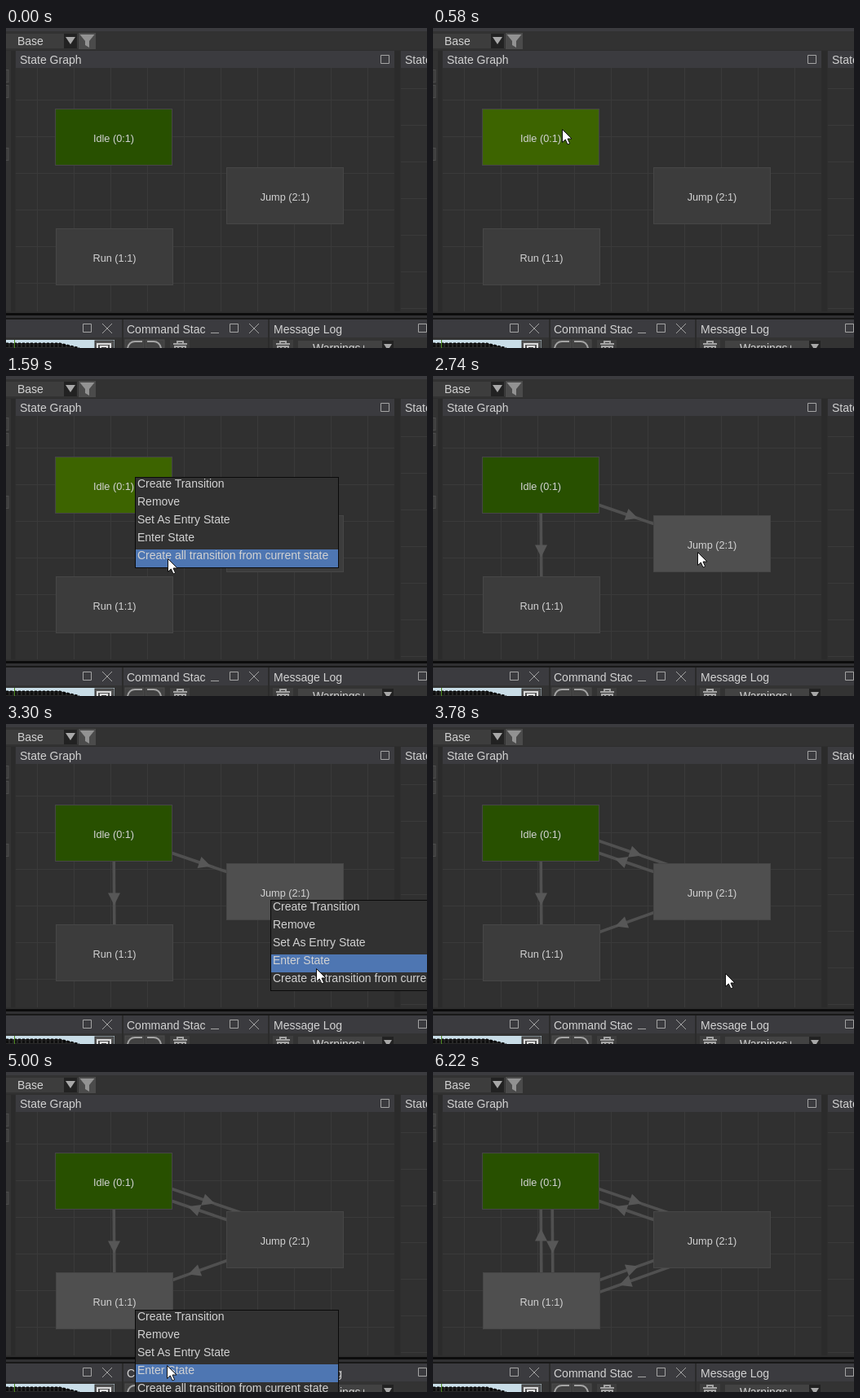
These frames come from a looping animation (516 by 393 pixels, 6.85 s). An HTML page:

```html
<!DOCTYPE html>
<html lang="en">
<head>
<meta charset="utf-8">
<title>State graph editor</title>
<style>
  html, body { margin: 0; width: 100%; height: 100%; overflow: hidden; background: #2e2e2e; }
  svg { display: block; width: 516px; height: 393px; }
  text { font: 14px "Liberation Sans", Arial, sans-serif; fill: #d2d2d2; white-space: pre; }
  .node { font-size: 12.7px; text-anchor: middle; }
</style>
</head>
<body>
<svg id="stage" viewBox="0 0 516 393"></svg>
<script>
const LOOP = 6850;
const stage = document.getElementById('stage');

function add(tag, attrs, parent = stage) {
  const el = document.createElementNS('http://www.w3.org/2000/svg', tag);
  for (const key in attrs) el.setAttribute(key, attrs[key]);
  parent.appendChild(el);
  return el;
}
const rect = (x, y, width, height, fill, parent, extra) =>
  add('rect', { x, y, width, height, fill, ...extra }, parent);
const path = (d, fill, stroke, parent, width = 1) =>
  add('path', { d, fill: fill || 'none', stroke: stroke || 'none', 'stroke-width': width }, parent);
function label(x, y, content, parent, cls = '') {
  const el = add('text', { x, y, class: cls }, parent);
  el.textContent = content;
  return el;
}
const show = (el, on) => el.setAttribute('visibility', on ? 'visible' : 'hidden');

const HEADER = '#3b3b3f', BODY = '#303030', GRID = '#3a3a3a', ICON = '#a4a4a4';

function square(x, y) { path(`M${x}.5 ${y}.5h10v10h-10z`, null, ICON); }
function cross(x, y) { path(`M${x} ${y}l12 12m0-12l-12 12`, null, ICON); }
function trash(x, y) {
  path(`M${x} ${y + 3}h17M${x + 5} ${y + 2}v-2h7v2M${x + 2} ${y + 6}h13v14h-13zM${x + 6} ${y + 7}v9m5-9v9`, null, ICON, stage, 2);
}
function gridPanel(x, width, title, gridX, gridY) {
  rect(x, 28, width, 21, HEADER);
  rect(x, 49, width, 299, BODY);
  let d = '';
  for (let y = gridY; y < 348; y += 45) d += `M${x} ${y}h${width}`;
  for (let gx = gridX; gx < x + width; gx += 45) d += `M${gx} 49v299`;
  path(d, null, GRID);
  label(x + 5, 44, title);
}

function drawWindow() {
  rect(0, 0, 516, 393, '#2e2e2e');
  rect(0, 0, 516, 4, '#3b3b3f');
  rect(0, 4, 516, 23, '#323232');
  rect(0, 7, 88, 18, '#3d3d3d');
  rect(71, 7, 16, 18, '#222');
  path('M73 11h12l-6 9z', '#a8a8a8');
  label(14, 21, 'Base');
  rect(89, 6, 21, 20, '#4b4b4b');
  path('M90.5 8h18l-6.5 8v8l-5-3v-5z', '#929292');

  rect(0, 28, 6, 320, '#333');
  for (const y of [51, 70, 147]) rect(-2, y + .5, 5, 15, '#3d3d3d', stage, { stroke: '#4d4d4d' });
  rect(6, 28, 5, 320, '#2b2b2b');
  gridPanel(12, 464, 'State Graph', 38.5, 88.5);
  square(459, 33);
  gridPanel(484, 32, 'State', 516, 74.5);
  rect(476, 28, 7, 320, '#2b2b2b');

  rect(0, 350, 516, 3, '#0c0c0c');
  rect(0, 353, 516, 4, '#303032');
  rect(0, 356, 516, 2, '#181818');
  rect(0, 358, 516, 35, '#2b2b2b');
  for (const [x, w] of [[0, 142], [144, 177], [323, 193]]) {
    rect(x, 358, w, 22, HEADER);
    rect(x, 380, w, 13, '#333');
  }
  label(148, 375, 'Command Stac');
  label(328, 375, 'Message Log');
  square(94, 363); cross(118, 363);
  path('M251 374.5h10', null, ICON);
  square(274, 363); cross(298, 363);
  square(505, 363);

  // Viewport sliver
  rect(0, 383, 133, 10, '#c9dde7');
  path('M0 387H66L90 393H0z', '#272727');
  path('M0 387.5H66L90 393M0 390.5H78', null, '#050505', stage, 2).setAttribute('stroke-dasharray', '3 2');
  rect(10, 383, 1, 10, '#4c8a20');
  rect(109, 384, 23, 9, '#555', stage, { stroke: '#333' });
  path('M112 393v-5h16v5M116 393v-2h8v2', null, '#ddd', stage, 2);

  for (const x of [146, 171]) rect(x, 383, 23, 10, '#424242', stage, { stroke: '#4d4d4d' });
  path('M149 393q2-8 9-8h9M190 393q-2-8-9-8h-8', null, ICON, stage, 2);
  rect(201, 383, 24, 10, '#3d3d3d'); trash(205, 385);
  rect(327, 383, 25, 10, '#3d3d3d'); trash(331, 385);
  rect(358, 384, 117, 9, '#424242');
  rect(461, 384, 14, 9, '#222');
  path('M463 388h10l-5 8z', '#a8a8a8');
  label(376, 398, 'Warnings+');
}

function node(x, y, name, fill, hover, from, until) {
  const box = rect(x + .5, y + .5, 143, 69, fill, stage, { stroke: '#464646' });
  label(x + 72, y + 40.5, name, stage, 'node');
  return { box, fill, hover, from, until, cx: x + 72, cy: y + 35 };
}

// Transition arrow between node centres, moved sideways by offset; its head starts halfway
function edge(a, b, offset, from, until) {
  const dx = b.cx - a.cx, dy = b.cy - a.cy, length = Math.hypot(dx, dy);
  const x = (a.cx + b.cx) / 2 + offset * dy / length;
  const y = (a.cy + b.cy) / 2 - offset * dx / length;
  const angle = Math.atan2(dy, dx) * 180 / Math.PI;
  const el = add('g', { transform: `translate(${x} ${y}) rotate(${angle})` }, edgeLayer);
  path(`M${-length / 2} 0H${length / 2}`, null, '#505050', el, 3.6);
  path('M0-7.5L15 0L0 7.5z', '#575757', null, el);
  return { el, from, until };
}

const ITEMS = ['Create Transition', 'Remove', 'Set As Entry State', 'Enter State',
  'Create all transition from current state'];
function menu(x, y, from, until) {
  const el = add('g', {});
  rect(x + .5, y + .5, 249, 111, '#313131', el, { stroke: '#0a0a0a' });
  const bar = rect(x + 1, y + 1, 248, 22, '#4e76b2', el);
  ITEMS.forEach((item, i) => label(x + 3, y + 13 + 22 * i, item, el));
  return { el, bar, y, from, until };
}

drawWindow();
const edgeLayer = add('g', {});
const idle = node(60, 99, 'Idle (0:1)', '#285000', '#3d6400', 580, 2740);
const jump = node(270, 171, 'Jump (2:1)', '#3c3c3c', '#4f4f4f', 2740, 4310);
const run = node(61, 246, 'Run (1:1)', '#3c3c3c', '#4f4f4f', 4310, LOOP);
const nodes = [idle, jump, run];

// A transition moves aside once its opposite exists
const ASIDE = 14;
const edges = [
  edge(idle, run, 0, 2050, 5850),
  edge(idle, jump, 0, 2050, 3780),
  edge(idle, jump, ASIDE, 3780, LOOP),
  edge(jump, idle, 0, 3780, LOOP),
  edge(jump, run, 0, 3780, 5850),
  edge(jump, run, ASIDE, 5850, LOOP),
  edge(run, jump, 0, 5850, LOOP),
  edge(idle, run, ASIDE, 5850, LOOP),
  edge(run, idle, 0, 5850, LOOP)
];
const menus = [menu(158, 124, 830, 2050), menu(324, 216, 2910, 3780), menu(158, 292, 4690, 5850)];
const cursor = path('M.5.5V16.5L4.3 13L7 19L9.6 17.8L7 12H12z', '#fff', '#111');

// Pointer legs: first step, last step, number of steps, end point
const START = [340, 337];
const LEGS = [
  [70, 430, 6, 158, 124],
  [1060, 1210, 3, 184, 147],
  [1290, 1590, 5, 198, 224],
  [2430, 2590, 3, 324, 216],
  [3140, 3300, 3, 380, 300],
  [3380, 3450, 2, 384, 308],
  [3780, 4160, 6, 158, 292],
  [4770, 5000, 4, 197, 360],
  [5080, 5240, 3, 203, 374],
  [5390, 5540, 3, 206, 385],
  [5850, 6150, 5, 428, 388]
];
const ease = p => (p + (1 - Math.cos(Math.PI * p)) / 2) / 2;

function pointer(t) {
  let [x, y] = START;
  for (const [first, last, steps, toX, toY] of LEGS) {
    if (t < first) break;
    const gap = (last - first) / (steps - 1);
    const p = ease(Math.min(1, (Math.floor((t - first + 5) / gap) + 1) / steps));
    x += (toX - x) * p;
    y += (toY - y) * p;
  }
  return [Math.round(x), Math.round(y)];
}

function render(t) {
  const active = part => t >= part.from && t < part.until;
  const [x, y] = pointer(t);
  edges.forEach(e => show(e.el, active(e)));
  nodes.forEach(n => n.box.setAttribute('fill', active(n) ? n.hover : n.fill));
  menus.forEach(m => {
    show(m.el, active(m));
    const row = Math.max(0, Math.min(4, Math.floor((y - m.y - 2) / 22)));
    m.bar.setAttribute('y', m.y + 1 + 22 * row);
  });
  show(cursor, t >= 70 && t < 6220);
  cursor.setAttribute('transform', `translate(${x} ${y})`);
}

const begin = performance.now();
function tick() {
  render((performance.now() - begin) % LOOP);
  requestAnimationFrame(tick);
}
tick();
</script>
</body>
</html>
```
